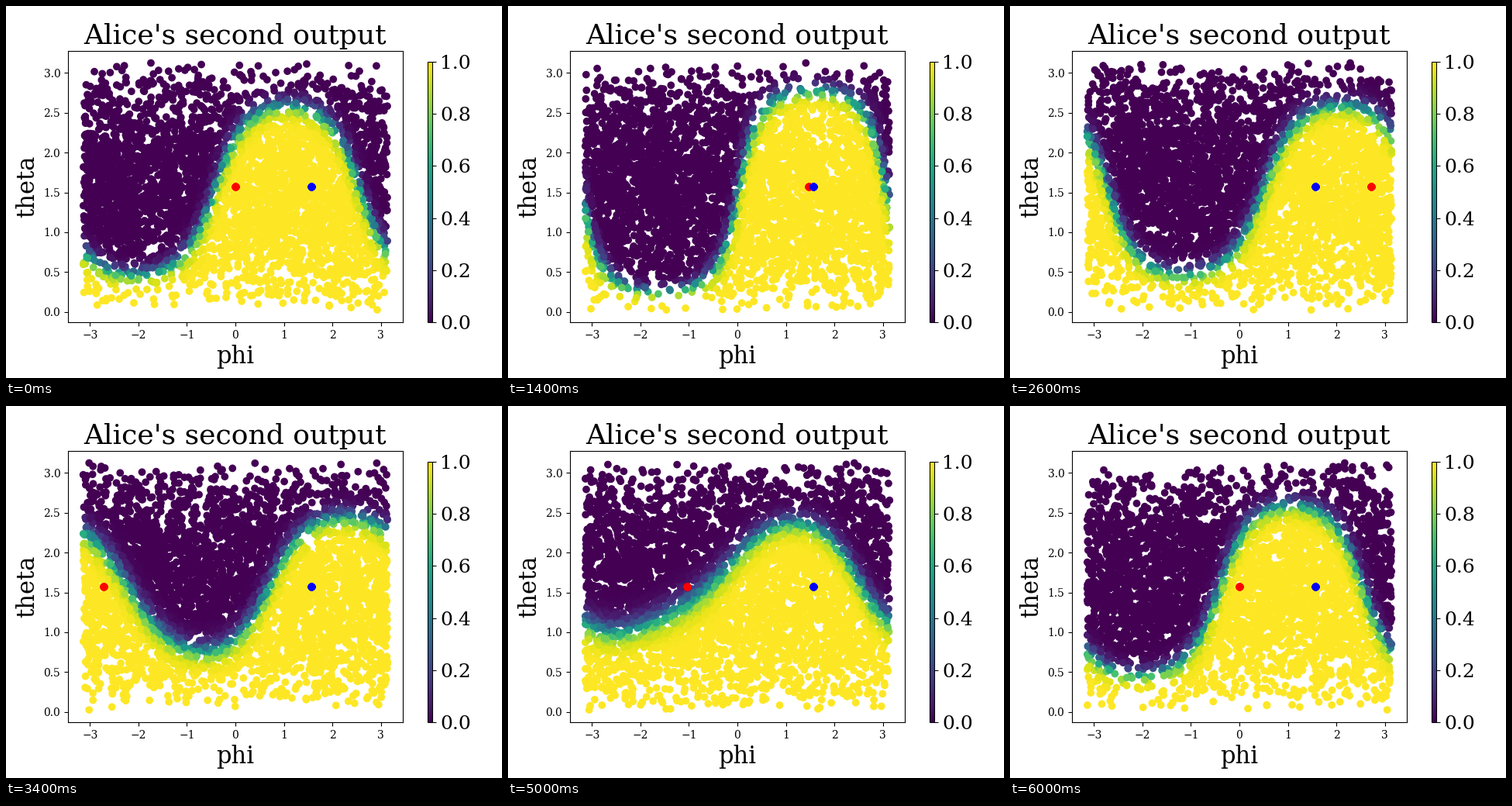
Recreate the animation shown at these times as a matplotlib script. Size 640 by 480 pixels, loop 6200 ms.

```python
import numpy as np
import matplotlib.pyplot as plt
from matplotlib.animation import FuncAnimation

FRAMES, STEP = 31, 200
POINTS, COPIES = 4000, 40
LOW, HIGH = 0.025, 3.125

plt.rcParams["font.family"] = "DejaVu Serif"


def sample(i):
    """Seeded random directions on the sphere."""
    rng = np.random.default_rng(100 + i)
    phi = rng.uniform(-np.pi, np.pi, POINTS)
    theta = np.arccos(rng.uniform(-1, 1, POINTS))
    theta = np.interp(theta, [theta.min(), theta.max()], [LOW, HIGH])
    return phi, theta


def output(phi, theta, t):
    """Soft step across a tilted plane that follows the red point."""
    pull = np.exp(0.28 + 0.9 * np.sin(t + 0.2))
    tilt = (0.87 * np.cos(t) * np.cos(phi) + pull * np.sin(phi)
            + 0.18 * np.sin(t) * np.cos(2 * phi + 0.3)
            - 0.06 - 0.28 * np.sin(t + 0.3))
    score = np.cos(theta) + np.sin(theta) * tilt
    return 1 / (1 + np.exp(-(12 - 1.5 * pull) * score))


def marker(phi, color):
    # Stacked copies give the hard edge
    return ax.scatter(np.full(COPIES, phi), np.full(COPIES, np.pi / 2), color=color)


fig = plt.figure(figsize=(6.4, 4.8), dpi=100)
ax = fig.add_axes([0.125, 0.15, 0.675, 0.73])
cax = fig.add_axes([0.85, 0.15, 0.01, 0.7])

cloud = ax.scatter(*sample(0), c=np.zeros(POINTS), cmap="viridis", vmin=0, vmax=1)
red = marker(0, "red")
blue = marker(np.pi / 2, "blue")

margin = 0.05 * (HIGH - LOW)
ax.set_xlim(-1.1 * np.pi, 1.1 * np.pi)
ax.set_ylim(LOW - margin, HIGH + margin)
ax.set_title("Alice's second output", fontsize=26)
ax.set_xlabel("phi", fontsize=22)
ax.set_ylabel("theta", fontsize=22)
fig.colorbar(cloud, cax=cax).ax.tick_params(labelsize=18)


def update(i):
    t = 2 * np.pi * i / (FRAMES - 1)
    phi, theta = sample(i)
    cloud.set_offsets(np.column_stack([phi, theta]))
    cloud.set_array(output(phi, theta, t))

    turn = (t + np.pi) % (2 * np.pi) - np.pi
    red.set_offsets(np.tile([turn, np.pi / 2], (COPIES, 1)))
    return cloud, red


anim = FuncAnimation(fig, update, frames=FRAMES, interval=STEP,
                     repeat=True, repeat_delay=0, blit=False)
plt.show()
```
